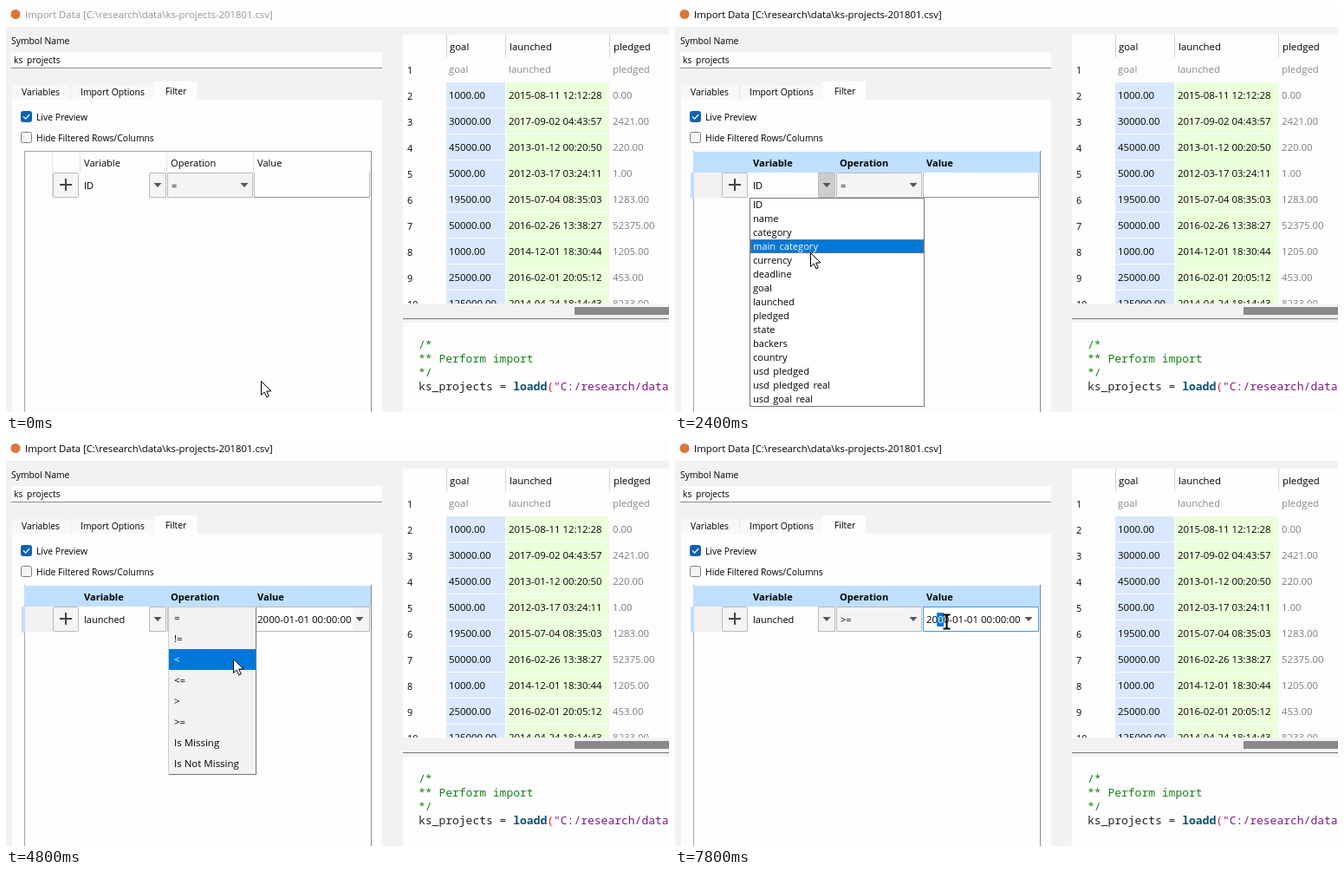
These frames come from a looping animation (765x468 px, 8 s). An HTML page with a canvas:

```html
<!DOCTYPE html>
<html lang="en">
<head>
<meta charset="utf-8">
<title>Import filter</title>
<style>
  html, body { margin: 0; width: 100%; height: 100%; overflow: hidden; background: #f4f1f3; }
  canvas { display: block; }
</style>
</head>
<body>
<canvas id="stage" width="765" height="468"></canvas>
<script>
const ctx = document.getElementById('stage').getContext('2d');
const LOOP = 8000, STEP = 200;
const SANS = '"Open Sans", "Noto Sans", sans-serif';
const MONO = '"Noto Sans Mono", "DejaVu Sans Mono", monospace';
const INK = '#000', BG = '#f4f1f3', PAPER = '#fefdfe', EDGE = '#bab7b9', DARK_EDGE = '#8b898b';
const BLUE = '#0078d7', PALE = '#bfdfff', ORANGE = '#e0711f';

const VARIABLES = ['ID', 'name', 'category', 'main category', 'currency', 'deadline', 'goal', 'launched',
  'pledged', 'state', 'backers', 'country', 'usd pledged', 'usd pledged real', 'usd goal real'];
const OPERATIONS = ['=', '!=', '<', '<=', '>', '>=', 'Is Missing', 'Is Not Missing'];
const ROWS = [
  ['1000.00', '2015-08-11 12:12:28', '0.00'],
  ['30000.00', '2017-09-02 04:43:57', '2421.00'],
  ['45000.00', '2013-01-12 00:20:50', '220.00'],
  ['5000.00', '2012-03-17 03:24:11', '1.00'],
  ['19500.00', '2015-07-04 08:35:03', '1283.00'],
  ['50000.00', '2016-02-26 13:38:27', '52375.00'],
  ['1000.00', '2014-12-01 18:30:44', '1205.00'],
  ['25000.00', '2016-02-01 20:05:12', '453.00'],
  ['125000.00', '2014-04-24 18:14:43', '8233.00']
];

// Pointer path: time, x, y
const PATH = [
  [0, 294, 432], [200, 290, 422], [1000, 172, 216], [2000, 172, 216], [2800, 139, 352], [3000, 139, 341],
  [3400, 139, 341], [4000, 217, 237], [4400, 270, 206], [4800, 262, 252], [5200, 262, 252],
  [5400, 255, 275], [5600, 244, 322], [6000, 240, 324], [6400, 240, 324], [7000, 303, 209],
  [7400, 303, 209], [7600, 313, 209], [8000, 313, 209]
];

// Moments at which the interface switches state
const AT = { active: 1200, listOpen: 1400, listClose: 3400, menuOpen: 4400, menuClose: 5800, edit: 7200, select: 7600 };

function rect(x, y, w, h, color) {
  ctx.fillStyle = color;
  ctx.fillRect(x, y, w, h);
}

function box(x, y, w, h, fill, edge = EDGE, line = 1, radius = 0) {
  ctx.beginPath();
  ctx.roundRect(x + line / 2, y + line / 2, w - line, h - line, radius);
  ctx.fillStyle = fill;
  ctx.fill();
  ctx.strokeStyle = edge;
  ctx.lineWidth = line;
  ctx.stroke();
}

function text(str, x, baseline, size = 10.35, color = INK, weight = 400, family = SANS) {
  ctx.font = `${weight} ${size}px ${family}`;
  ctx.fillStyle = color;
  ctx.fillText(str, x, baseline);
}

function shape(points, fill) {
  ctx.beginPath();
  points.forEach(([x, y]) => ctx.lineTo(x, y));
  ctx.closePath();
  ctx.fillStyle = fill;
  ctx.fill();
}

const chevron = (x, y) => shape([[x - 4.5, y - 2.5], [x + 4.5, y - 2.5], [x, y + 2.5]], '#555355');

function pointerAt(t) {
  const i = PATH.findIndex(key => key[0] > t);
  const [t0, x0, y0] = PATH[i - 1], [t1, x1, y1] = PATH[i];
  const k = (t - t0) / (t1 - t0);
  return [x0 + (x1 - x0) * k, y0 + (y1 - y0) * k];
}

function drawPointer(x, y, beam) {
  ctx.save();
  ctx.translate(Math.round(x) + .5, Math.round(y) + .5);
  ctx.lineWidth = 1;
  ctx.strokeStyle = INK;
  if (beam) {
    ctx.lineWidth = 2;
    ctx.beginPath();
    ctx.moveTo(-4, -8); ctx.lineTo(4, -8);
    ctx.moveTo(0, -8); ctx.lineTo(0, 8);
    ctx.moveTo(-4, 8); ctx.lineTo(4, 8);
    ctx.stroke();
  } else {
    shape([[0, 0], [0, 16], [3.6, 12.6], [6.3, 18.4], [8.8, 17.3], [6.2, 11.6], [11.4, 11.4]], '#fff');
    ctx.stroke();
  }
  ctx.restore();
}

function drawWindow(active) {
  rect(0, 0, 765, 468, BG);
  rect(0, 0, 765, 24, PAPER);
  ctx.beginPath();
  ctx.arc(11, 9.5, 5.5, 0, 7);
  ctx.fillStyle = '#d9783c';
  ctx.fill();
  text('Import Data [C:\\research\\data\\ks-projects-201801.csv]', 22, 14, 11.35, active ? INK : '#969496');

  text('Symbol Name', 6, 44);
  rect(6, 53, 428, 18, PAPER);
  rect(6, 71, 428, 1, DARK_EDGE);
  ctx.wordSpacing = '2px';
  text('ks projects', 9, 66);
  ctx.wordSpacing = '0px';

  rect(7, 91, 163, 17, '#f9f7f8');
  rect(74, 91, 1, 17, '#e9e6e8');
  rect(170, 87, 50, 22, PAPER);
  rect(7, 108, 427, 360, PAPER);
  text('Variables', 18, 103);
  text('Import Options', 86, 103);
  text('Filter', 184, 102);

  box(17, 121, 13, 13, '#0f62ad', '#0f62ad', 1, 2);
  ctx.beginPath();
  ctx.moveTo(20, 127.5); ctx.lineTo(22.7, 130.2); ctx.lineTo(27.2, 125);
  ctx.strokeStyle = '#fff';
  ctx.lineWidth = 1.2;
  ctx.stroke();
  text('Live Preview', 35, 132);
  box(17, 145, 13, 13, '#f5f3f5', '#7d7b7d', 1, 2);
  text('Hide Filtered Rows/Columns', 35, 156);
}

function drawPreview() {
  rect(458, 33, 307, 310, PAPER);
  ctx.save();
  ctx.beginPath();
  ctx.rect(458, 33, 307, 310);
  ctx.clip();
  const columns = [511, 580, 700], names = ['goal', 'launched', 'pledged'];
  [508, 576, 696].forEach(x => rect(x, 33, 1, 26, '#d4d1d3'));
  names.forEach((name, i) => {
    text(name, columns[i] + 1, 51, 11.4);
    text(name, columns[i], 77, 11.4, '#8a888a');
  });
  text('1', 463, 78, 10.8);
  ROWS.forEach((row, r) => {
    const y = 88 + r * 30;
    rect(508, y, 68, 29, '#d9e8fc');
    rect(577, y, 119, 29, '#eaffda');
    text(r + 2, 463, y + 20, 10.8);
    row.forEach((cell, i) => text(cell, columns[i], y + 19, 11.4, i < 2 ? INK : '#7d7b7d'));
  });
  ctx.restore();
  rect(656, 347, 109, 9, '#8b888a');
  rect(458, 360, 307, 1, '#757375');

  rect(458, 365, 307, 103, PAPER);
  const code = (str, column, baseline, color, weight) => text(str, 476 + column * 7.8, baseline, 13, color, weight, MONO);
  code('/*', 0, 395, '#178017');
  code('** Perform import', 0, 411, '#178017');
  code('*/', 0, 427, '#178017');
  code('ks_projects = ', 0, 443, '#202020');
  code('loadd', 14, 443, '#0b4f6c', 700);
  code('(', 19, 443, '#e02020');
  code('"C:/research/data', 20, 443, '#7d187d');
}

function drawFilter(t) {
  const active = t >= AT.active;
  const listOpen = t >= AT.listOpen && t < AT.listClose;
  const menuOpen = t >= AT.menuOpen && t < AT.menuClose;
  const chosen = t >= AT.listClose;
  const editing = t >= AT.edit;
  const rowSelected = chosen && !menuOpen && !editing;

  if (!active) rect(21, 167, 400, 1, '#a5a3a5');
  rect(21, 167, 1, 301, '#a5a3a5');
  rect(421, 167, 1, 301, DARK_EDGE);
  if (active) {
    rect(21, 168, 400, 24, PALE);
    rect(18, 192, 4, 30, PALE);
    rect(22, 192, 32, 29, BG);
  } else {
    [53, 85, 185, 285].forEach(x => rect(x, 168, 1, 24, '#e6e3e5'));
    rect(53, 192, 1, 29, '#e6e3e5');
  }
  [['Variable', 90], ['Operation', 190], ['Value', 290]]
    .forEach(([label, x]) => text(label, x, 185, 11.1, INK, active ? 700 : 400));

  if (rowSelected) rect(22, 192, 64, 29, BLUE);
  box(54, 192, 30, 29, '#f5f3f5', EDGE, 1, 1);
  rect(62, 205, 14, 2, '#444');
  rect(68, 199, 2, 14, '#444');

  if (rowSelected) box(86, 192, 79, 29, '#fff', t < AT.menuOpen ? ORANGE : BLUE, 2);
  text(chosen ? 'launched' : 'ID', 90, 211, 11);
  box(165, 192, 20, 29, listOpen ? '#cfccce' : '#f5f3f5', rowSelected ? '#dcd9db' : EDGE);
  chevron(175, 206.5);

  box(186, 192, 99, 29, '#f5f3f5', EDGE);
  text(t >= AT.menuClose ? '>=' : '=', 191, 211, 11);
  chevron(275, 206.5);

  if (chosen) {
    box(286, 192, 134, 29, '#fff', editing ? '#3a9be8' : EDGE);
    if (!editing) rect(400, 193, 19, 27, '#f5f3f5');
    text('2000-01-01 00:00:00', 290, 211, 11.5);
    if (t >= AT.select) {
      const x = 290 + ctx.measureText('20').width;
      rect(x - 1, 199, 8, 16, BLUE);
      text('0', x, 211, 11.5, '#fff');
    }
    chevron(408, 206.5);
  } else {
    rect(286, 192, 1, 29, EDGE);
    rect(286, 220, 134, 1, DARK_EDGE);
    rect(419, 192, 1, 29, EDGE);
  }
  return { listOpen, menuOpen };
}

function popupItems(items, x, w, top, pitch, hover, textX, size) {
  items.forEach((item, i) => {
    const y = top + i * pitch;
    if (i === hover) rect(x, y, w, pitch, BLUE);
    text(item, textX, y + pitch / 2 + 4, size, i === hover ? '#fff' : INK);
  });
}

function drawList(pointerY) {
  const hover = Math.max(0, Math.floor((pointerY - 221) / 16));
  box(86, 221, 202, 241, '#fff', '#757375');
  ctx.wordSpacing = '1.5px';
  popupItems(VARIABLES, 87, 200, 221, 16, hover, 90, 11.1);
  ctx.wordSpacing = '0px';
  ctx.setLineDash([1, 1]);
  ctx.strokeStyle = ORANGE;
  ctx.lineWidth = 1;
  ctx.strokeRect(87.5, 221.5 + hover * 16, 199, 15);
  ctx.setLineDash([]);
}

function drawMenu(pointerY) {
  box(187, 192, 102, 194, BG, '#cfccce');
  rect(288, 193, 1, 193, '#757375');
  rect(188, 385, 101, 1, '#757375');
  popupItems(OPERATIONS, 188, 100, 193, 24, Math.floor((pointerY - 193) / 24), 194, 11.5);
}

function draw(t) {
  const [x, y] = pointerAt(t);
  drawWindow(t >= AT.active);
  drawPreview();
  const { listOpen, menuOpen } = drawFilter(t);
  if (listOpen) drawList(y);
  if (menuOpen) drawMenu(y);
  drawPointer(x, y, t >= 7000);
}

function frame(now) {
  draw(Math.floor(now % LOOP / STEP) * STEP);
  requestAnimationFrame(frame);
}
requestAnimationFrame(frame);
</script>
</body>
</html>
```
